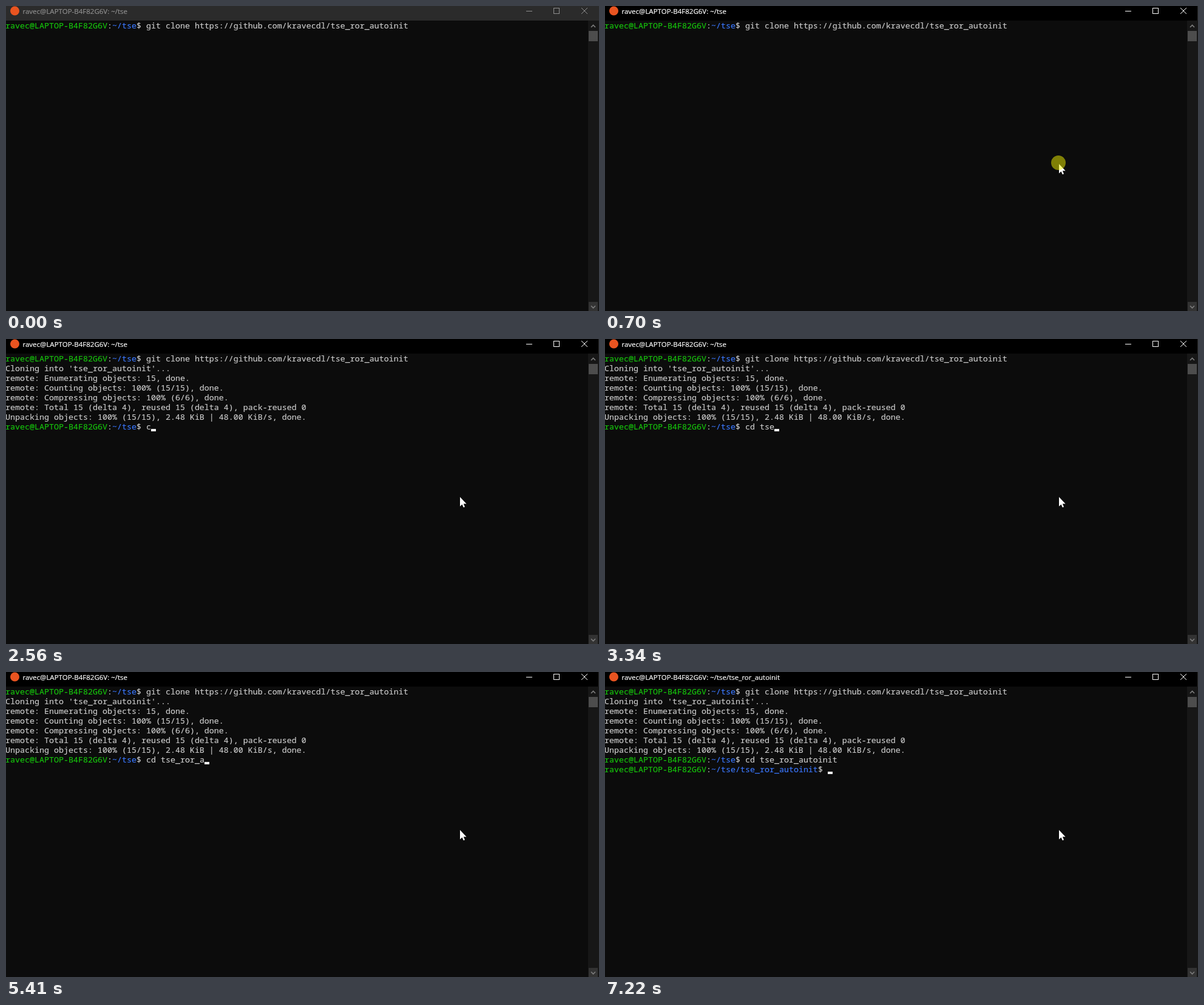
These frames come from a looping animation (977 px wide and 502 px high, 8 s). An HTML page:

```html
<!DOCTYPE html>
<html lang="en">
<head>
<meta charset="utf-8">
<title>Terminal</title>
<style>
  html, body { margin: 0; width: 100%; height: 100%; overflow: hidden; background: #0c0c0c; }
  #bar { position: absolute; inset: 0 0 auto; height: 24px; background: #000; color: #fff; }
  #bar.idle { background: #2b2b2b; color: #8e8e8e; }
  #title { position: absolute; left: 27.5px; top: 0; font: 11.5px/17px "Open Sans", sans-serif; white-space: pre;
           -webkit-text-stroke: .2px; }
  #screen { position: absolute; left: -1px; top: 24px; margin: 0; color: #ccc;
            font: 13.3333px/16px "Noto Sans Mono", monospace; font-variant-ligatures: none;
            -webkit-text-stroke: .15px; }
  .host { color: #16c60c; }
  .path { color: #3b78ff; }
  #caret { position: absolute; width: 8px; height: 4px; background: #f2f2f2; }
  svg { position: absolute; left: 0; top: 0; }
</style>
</head>
<body>
<div id="bar" class="idle">
  <div id="title"></div>
  <svg width="977" height="24" fill="none" stroke="currentColor">
    <circle cx="14.5" cy="8" r="7.5" fill="#e95420" stroke="none"/>
    <path d="M857 8.5h10M902.5 3.5h9v9h-9z" shape-rendering="crispEdges"/>
    <path d="M948 3l10 10M958 3l-10 10"/>
    <path d="M976.5 0v24" stroke="#2b2b2b"/>
  </svg>
</div>
<pre id="screen"></pre>
<div id="caret"></div>
<svg width="977" height="502">
  <path fill="#171717" d="M959 24h18v478h-18z"/>
  <path fill="#4d4d4d" d="M960 41h15v17h-15z"/>
  <path fill="#333" d="M960 487h15v15h-15z"/>
  <path fill="none" stroke="#7d7d7d" stroke-width="1.6" d="M964 35l3.5-3.5l3.5 3.5M964 493.5l3.5 3.5l3.5-3.5"/>
  <path id="mouse" fill="#fff" d="M0 0V15.5L3.5 12.3L5.8 17.2L8 16.3L5.8 11.3H10.6Z"/>
  <circle id="click" cx="747" cy="258" r="12" fill="#f4f400" fill-opacity=".5"/>
</svg>
<script>
const LOOP = 8000;
const HOST = 'ravec@LAPTOP-B4F82G6V', DIR = '~/tse', REPO = 'tse_ror_autoinit';
const $ = id => document.getElementById(id);

// "<" stands for backspace
const KEYS = 'cd tse_rio<<or_autoinig<t';
const KEY_TIMES = [2560, 2640, 2790, 3110, 3260, 3340, 3570, 3800, 3870, 3950, 4410, 4490, 4950,
  5030, 5180, 5410, 5580, 5650, 5730, 5900, 5970, 6050, 6200, 6600, 6670];

const prompt = (dir, command = '') =>
  `<span class="host">${HOST}</span>:<span class="path">${dir}</span>$ ${command}`;
const promptWidth = dir => HOST.length + dir.length + 3;

function typed(t) {
  let text = '';
  KEY_TIMES.forEach((time, i) => {
    if (t >= time) text = KEYS[i] === '<' ? text.slice(0, -1) : text + KEYS[i];
  });
  return text;
}

// Lines on screen and the caret's row and column
function terminal(t) {
  const lines = [prompt(DIR, `git clone https://github.com/kravecdl/${REPO}`)];
  if (t < 1230) return { lines };
  lines.push(`Cloning into '${REPO}'...`);
  if (t < 1860) return { lines, row: 2, col: 0 };
  lines.push(
    'remote: Enumerating objects: 15, done.',
    'remote: Counting objects: 100% (15/15), done.',
    'remote: Compressing objects: 100% (6/6), done.',
    'remote: Total 15 (delta 4), reused 15 (delta 4), pack-reused 0',
    t < 1940 ? 'Unpacking objects:  73% (11/15)'
             : 'Unpacking objects: 100% (15/15), 2.48 KiB | 48.00 KiB/s, done.');
  if (t < 1940) return { lines, row: 6, col: 0 };
  if (t < 2010) return { lines, row: 7, col: 0 };
  const command = typed(t);
  lines.push(prompt(DIR, command));
  if (t < 7220) return { lines, row: 7, col: promptWidth(DIR) + command.length };
  const dir = `${DIR}/${REPO}`;
  lines.push(prompt(dir));
  return { lines, row: 8, col: promptWidth(dir) };
}

const show = (el, on) => el.style.visibility = on ? 'visible' : 'hidden';

let shown = '';
function draw() {
  const t = performance.now() % LOOP;
  const { lines, row, col } = terminal(t);
  const html = lines.join('\n');
  if (html !== shown) $('screen').innerHTML = shown = html;

  show($('caret'), row !== undefined);
  if (row !== undefined) {
    $('caret').style.left = col * 8 - 1 + 'px';
    $('caret').style.top = row * 16 + 36 + 'px';
  }

  $('bar').className = t < 700 ? 'idle' : '';
  $('title').textContent = `${HOST}: ${DIR}${t < 7220 ? '' : '/' + REPO}`;

  const [x, y] = t < 375 ? [853, 463] : t < 450 ? [780, 325] : [748, 260];
  $('mouse').setAttribute('transform', `translate(${x} ${y})`);
  show($('mouse'), t >= 300);
  show($('click'), t >= 700 && t < 930);
  requestAnimationFrame(draw);
}
draw();
</script>
</body>
</html>
```
